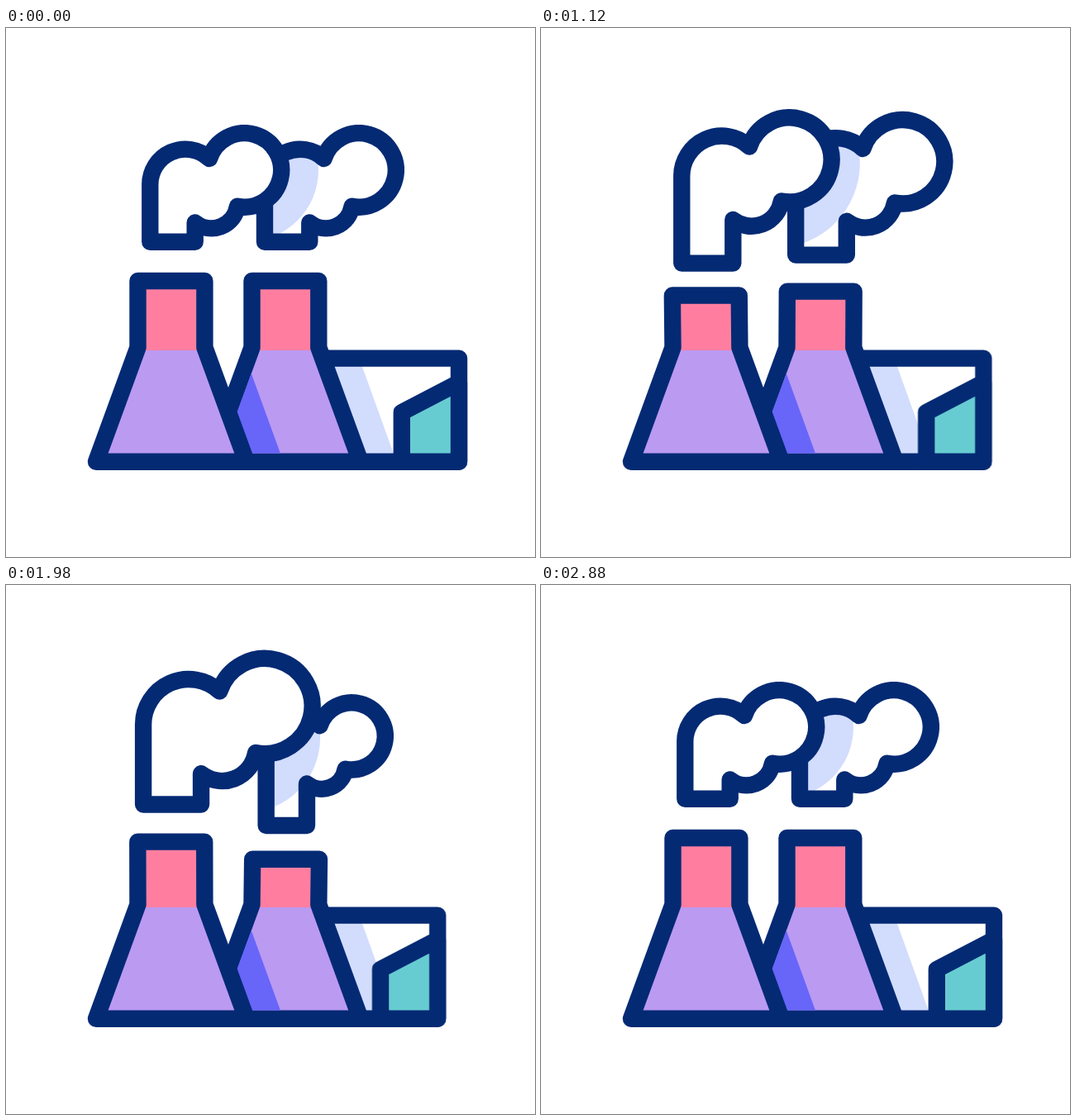
An HTML page without scripts that plays this animation: 640 by 640 pixels, repeating every 3020 ms.

```html
<!DOCTYPE html>
<html lang="en">
<head>
<meta charset="utf-8">
<title>Power plant</title>
<style>
  html, body { margin: 0; width: 100%; height: 100%; overflow: hidden; background: #fff; }
  svg { display: block; width: 100%; height: 100%; }

  .line { stroke: #042a74; stroke-width: 20.4; stroke-linejoin: round; stroke-linecap: round; }

  /* four swings of 720 ms, then a rest of 140 ms */
  .hall, .tower-l, .tower-r, .steam-l, .steam-r, .shade {
    animation: 3020ms cubic-bezier(.333, 0, .667, 1) infinite;
  }
  .hall { animation-name: hall; }
  .tower-l { animation-name: tower-l; }
  .tower-r { animation-name: tower-r; }
  .steam-l { animation-name: steam-l; }
  .steam-r { animation-name: steam-r; }
  .shade { animation-name: shade; }

  @keyframes hall {
    0%, 47.682%, 95.364%, 100% { transform: translateX(0); }
    23.841%, 71.523% { transform: translateX(-30.5px); }
  }

  @keyframes tower-l {
    0%, 23.841%, 71.523%, 95.364%, 100% {
      d: path("M159.5 306 L240.4 306 L240.4 386.5 L290.9 524.8 L109 524.8 L159.5 386.5 Z");
    }
    47.682% {
      d: path("M158.4 336 L239.3 336 L240.4 386.5 L290.9 524.8 L109 524.8 L159.5 386.5 Z");
    }
  }

  @keyframes tower-r {
    0%, 47.682%, 95.364%, 100% {
      d: path("M297.5 306 L378.3 306 L378.3 386.5 L428.8 524.8 L247 524.8 L297.5 386.5 Z");
    }
    23.841%, 71.523% {
      d: path("M298.3 336.5 L379.1 336.5 L378.3 386.5 L428.8 524.8 L247 524.8 L297.5 386.5 Z");
    }
  }

  @keyframes steam-l {
    0%, 95.364%, 100% {
      d: path("M174.3 258.7 L174.3 190.2 A42.7 42.7 0 0 1 246 158 A44.7 44.7 0 1 1 280 215.8 A32 32 0 0 1 228.7 235.5 L228.7 258.7 Z");
    }
    23.841%, 71.523% {
      d: path("M164.6 258.7 L164.6 166.3 A57.2 57.2 0 0 1 260.6 123.2 A59.9 59.9 0 1 1 306.1 200.6 A42.8 42.8 0 0 1 237.4 226.9 L237.4 258.7 Z");
    }
    47.682% {
      d: path("M174.3 303 L174.3 190.2 A42.7 42.7 0 0 1 246 158 A44.7 44.7 0 1 1 280 215.8 A32 32 0 0 1 228.7 235.5 L228.7 303 Z");
    }
  }

  @keyframes steam-r {
    0%, 95.364%, 100% {
      d: path("M313 258.7 L313 190.2 A42.7 42.7 0 0 1 384.6 158 A44.7 44.7 0 1 1 418.6 215.8 A32 32 0 0 1 367.3 235.5 L367.3 258.7 Z");
    }
    23.841%, 71.523% {
      d: path("M317 297 L317 205.5 A35.3 35.3 0 0 1 376.2 178.9 A36.9 36.9 0 1 1 404.3 226.7 A26.4 26.4 0 0 1 361.9 242.9 L361.9 297 Z");
    }
    47.682% {
      d: path("M301.9 258.7 L301.9 166.1 A57.8 57.8 0 0 1 398.8 122.6 A60.5 60.5 0 1 1 444.8 200.8 A43.3 43.3 0 0 1 375.4 227.4 L375.4 258.7 Z");
    }
  }

  @keyframes shade {
    0%, 95.364%, 100% { cx: 292px; cy: 172px; r: 86px; }
    23.841%, 71.523% { cx: 292px; cy: 192.6px; r: 86px; }
    47.682% { cx: 277px; cy: 142.5px; r: 114.5px; }
  }
</style>
</head>
<body>
<svg viewBox="0 0 640 640">
  <defs>
    <linearGradient id="coat" gradientUnits="userSpaceOnUse" x1="0" y1="0" x2="0" y2="640">
      <stop offset=".6086" stop-color="#ff7ea0"/>
      <stop offset=".6086" stop-color="#bb9af2"/>
    </linearGradient>
    <clipPath id="puff"><path class="steam-r"/></clipPath>
  </defs>

  <path fill="#d2dcfd" d="M380 400H427.5L472.5 525H380Z"/>
  <g class="hall line">
    <path fill="none" d="M372 399.6H548V524.8H372"/>
    <path fill="#67ccd1" d="M548 429L478.8 465V524.8H548Z"/>
  </g>

  <path class="tower-r line" fill="url(#coat)"/>
  <path fill="#6865f9" d="M296.8 418L331.9 514.6H288L278 469Z"/>
  <path class="tower-l line" fill="url(#coat)"/>

  <path class="steam-r" fill="#fff"/>
  <g clip-path="url(#puff)"><circle class="shade" fill="#d2dcfd"/></g>
  <path class="steam-r line" fill="none"/>
  <path class="steam-l line" fill="#fff"/>
</svg>
</body>
</html>
```
